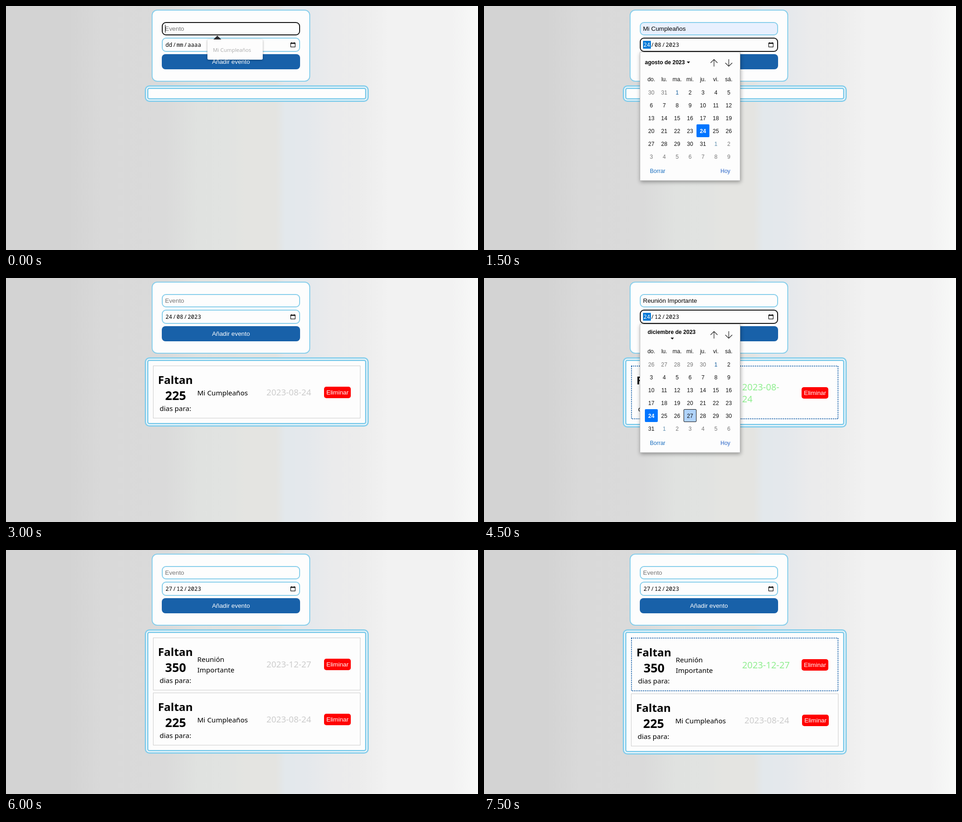
Recreate the animation shown at these times as an HTML page. Size 1024 by 532 pixels, loop 8000 ms.

```html
<!DOCTYPE html>
<html lang="es">
<head>
<meta charset="utf-8">
<title>Cuenta regresiva de eventos</title>
<style>
html, body { margin: 0; width: 100%; height: 100%; overflow: hidden; }
body {
  background: linear-gradient(90deg,
    #d3d3d3 0, #d3d3d3 135px, #d9d9d9 207px, #dadada 345px,
    #e0e2e0 417px, #e1e3e1 480px, #e4e4e1 520px, #e4e4e1 585px,
    #e3e8ec 606px, #e4e8ec 650px, #ebebec 710px, #ececec 765px,
    #f2f2f2 832px, #f2f2f2 968px, #f8f9f8 1024px);
}
svg { display: block; width: 1024px; height: 532px; }
text { font: 13.333px "Liberation Sans", Arial, sans-serif; white-space: pre; }
.mid { text-anchor: middle; }
.mono { font: 12.2px "Noto Sans Mono", monospace; }
.cal { font-size: 12px; }
.b { font-weight: 700; }
.head { font: 700 24px "Noto Sans", sans-serif; text-anchor: middle; }
.count { font: 700 26.5px "Noto Sans", sans-serif; text-anchor: middle; }
.body { font: 15px "Noto Sans", sans-serif; }
.date { font: 500 18.6px "Noto Sans", sans-serif; }
.date.on { font-size: 19.8px; }
.tip { font: 11.4px "Open Sans", sans-serif; }
.popup { filter: drop-shadow(1px 3px 4px rgba(0, 0, 0, .35)); }
.hint { filter: drop-shadow(0 1px 2px rgba(0, 0, 0, .35)); }
</style>
</head>
<body>
<svg id="stage" viewBox="0 0 1024 532"></svg>
<script>
const SKY = '#87ceeb', BLUE = '#1861a9', PAPER = '#fdfdfd', INK = '#111';

const text = (x, y, s, fill = '#000', cls = '') =>
  `<text x="${x}" y="${y}" fill="${fill}" class="${cls}">${s}</text>`;

const fillBox = (x, y, w, h, r, fill) =>
  `<rect x="${x}" y="${y}" width="${w}" height="${h}" rx="${r}" fill="${fill}"/>`;

// Box with its border drawn inside the given bounds
const box = (x, y, w, h, r, stroke, bw = 2, fill = PAPER, extra = '') =>
  `<rect x="${x + bw / 2}" y="${y + bw / 2}" width="${w - bw}" height="${h - bw}"
    rx="${Math.max(0, r - bw / 2)}" fill="${fill}" stroke="${stroke}" stroke-width="${bw}" ${extra}/>`;

const line = (d, stroke = '#222', w = 1.2) =>
  `<path d="${d}" fill="none" stroke="${stroke}" stroke-width="${w}"/>`;

const shape = (d, fill) => `<path d="${d}" fill="${fill}"/>`;

function form({ name = '', date, focus = '', filled = false }) {
  const edge = key => (focus === key ? INK : SKY);
  const [d, m, y] = date.split('/');
  const picked = focus === 'date';
  return box(316, 8, 344, 157, 12, SKY) +
    box(338, 35, 300, 29, 9, edge('name'), 2, filled ? '#e8f0fe' : PAPER) +
    text(345, 54, name || 'Evento', name ? '#000' : '#757575') +
    (focus === 'name' ? fillBox(345, 41, 1, 17, 0, '#000') : '') +
    box(338, 69, 300, 31, 9, edge('date')) +
    (picked ? fillBox(345, 76, 17, 17, 0, '#0078d7') : '') +
    text(346, 89, d, picked ? '#fff' : '#000', 'mono') +
    text(361.7, 89, '/', '#000', 'mono') +
    text(370, 89, m, '#000', 'mono') +
    text(385.7, 89, '/', '#000', 'mono') +
    text(394, 89, y, '#000', 'mono') +
    box(617, 80, 11, 10, 1, INK, 1.2, 'none') +
    shape('M617 80h11v2.4h-11zM619 79h1.5v2h-1.5zM624.5 79h1.5v2h-1.5z', INK) +
    fillBox(338, 105, 300, 33, 8, BLUE) +
    text(488, 126, 'Añadir evento', '#fff', 'mid');
}

const list = (bottom, items = '') =>
  box(301, 173, 486, bottom - 173, 10, SKY, 3) +
  box(306, 178, 476, bottom - 183, 5, SKY, 3) + items;

function item(y, days, name, date, hover = false) {
  const o = hover ? 1 : 0;
  const bx = 690 - o, by = y + 46 + o;
  const lines = (rows, x, base, gap, fill, cls) =>
    rows.map((s, i) => text(x, base + (i - (rows.length - 1) / 2) * gap, s, fill, cls)).join('');
  return (hover
      ? box(319, y, 450, 117, 0, BLUE, 2, PAPER, 'stroke-dasharray="2 2"')
      : box(319, y, 450, 115, 0, '#ccc', 1)) +
    text(367.5 + o, y + 40 + o, 'Faltan', '#000', 'head') +
    text(368 + o, y + 75 + o, days, '#000', 'count') +
    text(367.5 + o, y + 99 + o, 'dias para:', '#000', 'body mid') +
    lines(name, 415 + o, y + 64.5 + o, 23, '#000', 'body') +
    lines(date, hover ? 560 : 565, y + 65 + o * 2, 26, hover ? '#90ee90' : '#ccc', 'date' + (hover ? ' on' : '')) +
    fillBox(bx, by, 58, 25, 5, '#f00') +
    text(bx + 5, by + 17, 'Eliminar', '#fff');
}

// offset: cells before day 1; prev: length of the month before
function calendar({ offset, prev, selected, hover }) {
  let cells = '';
  for (let i = 0; i < 42; i++) {
    const n = i - offset + 1;
    const inside = n > 0 && n <= 31;
    const day = n < 1 ? n + prev : inside ? n : n - 31;
    const x = 349 + i % 7 * 28, y = 174 + Math.floor(i / 7) * 28;
    let fill = inside ? '#101010' : '#767676', cls = 'cal mid';
    if (day === 1) fill = inside ? '#0f5a9a' : '#5f8fae';
    if (n === selected) {
      cells += fillBox(x, y, 28, 28, 2, '#0075ff');
      fill = '#fff';
      cls += ' b';
    } else if (n === hover) {
      cells += box(x, y, 28, 28, 2, INK, 1, '#b0d3fb');
    }
    cells += text(x + 14, y + 19, day, fill, cls);
  }
  return cells;
}

function popup(title, month) {
  const names = ['do.', 'lu.', 'ma.', 'mi.', 'ju.', 'vi.', 'sá.'];
  return `<g class="popup">${box(338, 100, 218, 281, 1, '#bfbfbf', 1)}</g>` + title +
    line('M499 132V117M491.5 124L499 116.5L506.5 124') +
    line('M531 116V131M523.5 124L531 131.5L538.5 124') +
    names.map((s, i) => text(363 + i * 28, 164, s, '#101010', 'cal mid')).join('') +
    calendar(month) +
    text(360, 364, 'Borrar', '#1a6fc0', 'cal') +
    text(513, 364, 'Hoy', '#2a66c8', 'cal');
}

const hint =
  `<g class="hint">${fillBox(437, 73, 120, 44, 3, PAPER)}</g>` +
  shape('M450 73L458.5 64.5L467 73Z', '#2b2c30') +
  text(449, 100, 'Mi Cumpleaños', '#aaa', 'tip');

const august = popup(
  text(349, 127, 'agosto de 2023', '#000', 'cal b') + shape('M440 121h7l-3.5 4z', '#000'),
  { offset: 2, prev: 31, selected: 24 });

const december = popup(
  text(407, 122, 'diciembre de 2023', '#000', 'cal b mid') + shape('M405 130h7l-3.5 4z', '#000'),
  { offset: 5, prev: 30, selected: 24, hover: 27 });

const birthday = ['Mi Cumpleaños'], meeting = ['Reunión', 'Importante'];
const bDay = ['2023-08-24'], mDay = ['2023-12-27'];
const ready = form({ date: '27/12/2023' });

const LOOP = 8000;
const scenes = [
  [0, form({ date: 'dd/mm/aaaa', focus: 'name' }) + list(209) + hint],
  [1500, form({ name: 'Mi Cumpleaños', date: '24/08/2023', focus: 'date', filled: true }) + list(209) + august],
  [3000, form({ date: '24/08/2023' }) + list(324, item(191, 225, birthday, bDay))],
  [4500, form({ name: 'Reunión Importante', date: '24/12/2023', focus: 'date' }) +
    list(326, item(191, 225, birthday, ['2023-08-', '24'], true)) + december],
  [6000, ready + list(444, item(191, 350, meeting, mDay) + item(311, 225, birthday, bDay))],
  [7500, ready + list(446, item(191, 350, meeting, mDay, true) + item(313, 225, birthday, bDay))]
];

const stage = document.getElementById('stage');
stage.innerHTML = scenes.map(([, s]) => `<g display="none">${s}</g>`).join('');
const layers = [...stage.children];
const start = performance.now();
let shown = -1;

function tick() {
  const t = (performance.now() - start) % LOOP;
  const now = scenes.findLastIndex(([at]) => at <= t);
  if (now !== shown) {
    layers.forEach((g, i) => g.setAttribute('display', i === now ? 'inline' : 'none'));
    shown = now;
  }
  requestAnimationFrame(tick);
}
tick();
</script>
</body>
</html>
```
